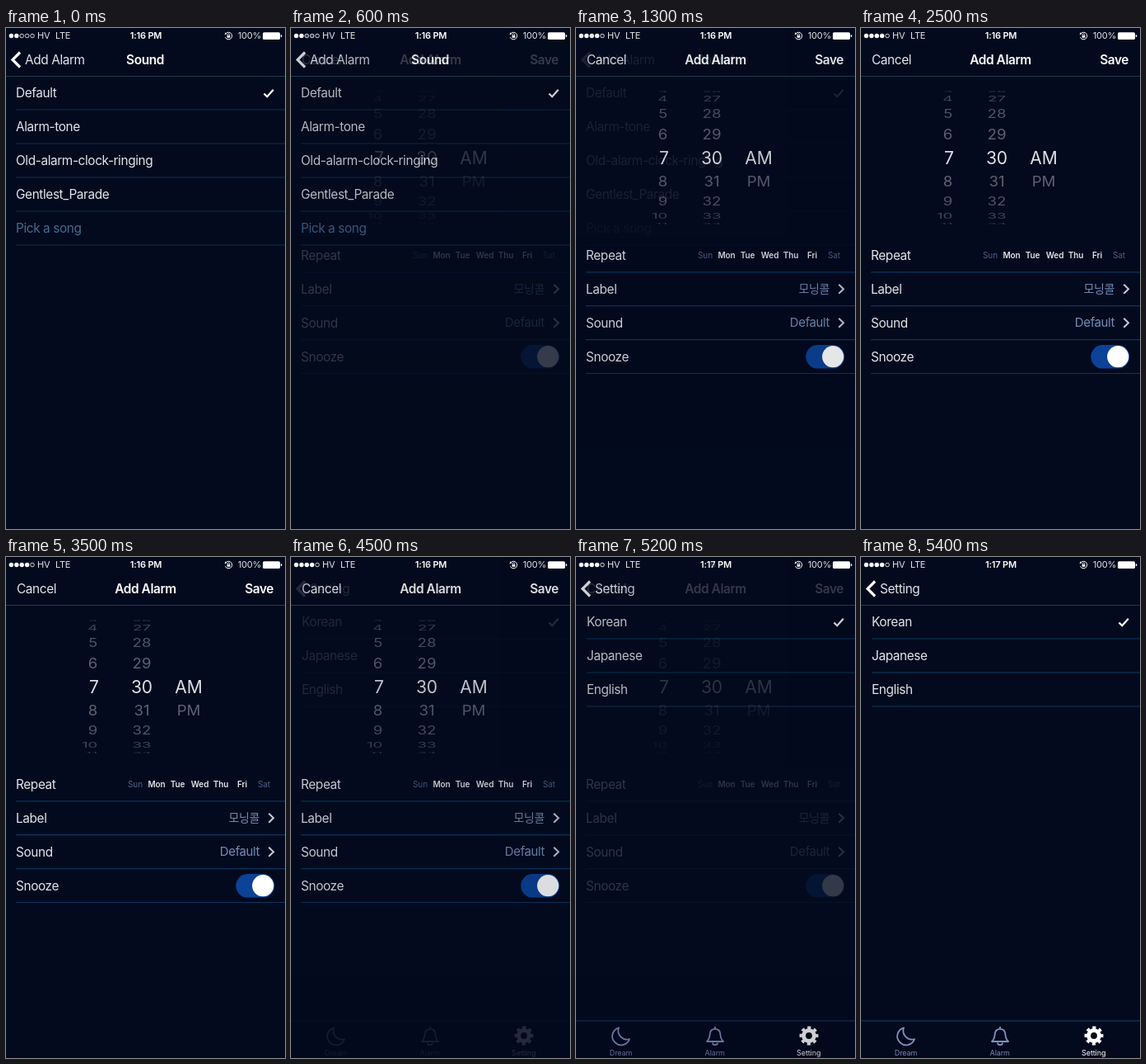
An HTML page that plays this animation: 339x607 px, repeating every 8 s.

```html
<!DOCTYPE html>
<html lang="en">
<head>
<meta charset="utf-8">
<title>Alarm settings</title>
<style>
html, body { margin: 0; width: 100%; height: 100%; overflow: hidden; background: #030a1d; }
svg { position: absolute; left: 0; top: 0; width: 100%; height: 100%; }
text { font: 400 15.4px Inter, "Noto Sans CJK KR", "Noto Sans CJK", sans-serif; letter-spacing: -.4px; fill: #e1e5ea; }
.title { font-weight: 600; fill: #fff; }
.mid { text-anchor: middle; }
.end { text-anchor: end; }
.status { font-size: 11px; letter-spacing: -.2px; }
.pick { font-size: 18.6px; letter-spacing: 0; }
.now { font-size: 21px; fill: #dde1e6; }
.day { font-size: 10px; letter-spacing: -.1px; font-weight: 600; }
.off { font-weight: 400; fill: #486088; }
.value { font-size: 15px; fill: #748cb5; }
.tab { font-size: 9px; letter-spacing: -.1px; fill: #7488b0; }
.line { fill: none; stroke: #fff; }
.icon { fill: none; stroke: #7f93bd; stroke-width: 1.8; stroke-linejoin: round; }
#alarm { animation: toAlarm 8s infinite; }
#setting { animation: toSetting 8s infinite; }
@keyframes toAlarm {
  0% { opacity: 0; animation-timing-function: step-end; }
  5% { opacity: 0; animation-timing-function: steps(10); }
  17.5%, 100% { opacity: 1; }
}
@keyframes toSetting {
  0% { opacity: 0; animation-timing-function: step-end; }
  52.5% { opacity: 0; animation-timing-function: steps(2); }
  55% { opacity: .04; animation-timing-function: steps(10); }
  67.5%, 100% { opacity: 1; }
}
</style>
</head>
<body>
<svg id="sound" viewBox="0 0 339 607" preserveAspectRatio="none"></svg>
<svg id="alarm" viewBox="0 0 339 607" preserveAspectRatio="none"></svg>
<svg id="setting" viewBox="0 0 339 607" preserveAspectRatio="none"></svg>
<script>
const text = (x, y, label, cls = '', extra = '') =>
  `<text x="${x}" y="${y}" class="${cls}" ${extra}>${label}</text>`;
const line = (x, y, color) =>
  `<path class="line" d="M${x} ${y}H339" style="stroke:${color};stroke-width:1.2"/>`;
const stroke = (d, width, color = '#fff') =>
  `<path class="line" d="${d}" style="stroke:${color};stroke-width:${width}"/>`;
const back = label => stroke('M17 29.5L8 38.5L17 47.5', 3.2) + text(23, 44, label);
const check = () => stroke('M313.5 79.5L317.3 83.2L324.8 74.8', 2.3);
const each = (list, fn) => list.map(fn).join('');

function statusBar(bars, time) {
  const dots = each([0, 1, 2, 3, 4], i => i < bars
    ? `<circle cx="${6.4 + 6.4 * i}" cy="9.5" r="2.7" fill="#fff"/>`
    : `<circle cx="${6.4 + 6.4 * i}" cy="9.5" r="2.3" class="line" stroke-width=".8"/>`);
  const lock = stroke('M267.2 6.6A4.3 4.3 0 1 1 266.4 11.2', 1) +
    '<path d="M265.6 8.2l.8-3 2.3 2z" fill="#fff"/><rect x="268.6" y="9" width="3.8" height="2.8" fill="#fff"/>' +
    stroke('M269.3 9V8.2a1.2 1.2 0 0 1 2.4 0V9', .8);
  const battery = '<rect x="312" y="5.2" width="21" height="8.8" rx="1.6" fill="#fff"/>' +
    '<path d="M333.8 8v3.2a1.6 1.6 0 0 0 0-3.2z" fill="#fff"/>';
  return '<rect width="339" height="607" fill="#030a1d"/>' + dots +
    text(38, 13.4, 'HV', 'status') + text(60, 13.4, 'LTE', 'status') +
    text(170, 13.4, time, 'status title mid') + lock +
    text(310, 13.4, '100%', 'status end') + battery + line(0, 58.5, '#174050');
}

function list(x, labels, color) {
  return each(labels, (label, i) =>
    text(x, 84.3 + 41 * i, label) + line(x, 99 + 41 * i, color));
}

// Wheel rows sit on a cylinder of radius 81, 20.5 degrees apart.
function wheel(x, first, from, to, anchor) {
  let out = '';
  for (let k = from; k <= to; k++) {
    const a = k * 20.5 * Math.PI / 180, c = Math.cos(a);
    const label = typeof first === 'number' ? first + k : first[k];
    const shade = [1, .4, .34, .27, .2][Math.abs(k)];
    const dx = k === 0 && anchor === 'end' ? 1.5 : 0;
    const size = k ? 6.7 : 7.6;
    out += `<g transform="translate(${x + dx} ${157 + 81 * Math.sin(a)}) scale(1 ${c})" opacity="${shade}">` +
      text(0, size, label, `pick ${anchor}${k ? '' : ' now'}`) + '</g>';
  }
  return out;
}

function soundScreen() {
  const sep = '#0d3050';
  return statusBar(2, '1:16 PM') + back('Add Alarm') + text(169, 44, 'Sound', 'title mid') +
    list(12, ['Default', 'Alarm-tone', 'Old-alarm-clock-ringing', 'Gentlest_Parade'], sep) +
    text(12, 248.3, 'Pick a song', '', 'style="fill:#466a90"') + line(12, 263, sep) + check();
}

function alarmScreen() {
  const days = [['Sun', 157], ['Mon', 183], ['Tue', 208.5], ['Wed', 235.5], ['Thu', 261], ['Fri', 287], ['Sat', 313.5]];
  const arrow = y => stroke(`M319.3 ${y - 5.5}L325 ${y}L319.3 ${y + 5.5}`, 2, '#c3cbd6');
  return statusBar(4, '1:16 PM') + text(13, 44, 'Cancel') +
    text(169.5, 44, 'Add Alarm', 'title mid') + text(325, 44, 'Save', 'title end') +
    wheel(111.3, 7, -4, 4, 'end') + wheel(165, 30, -4, 4, 'mid') + wheel(222, ['AM', 'PM'], 0, 1, 'mid') +
    each(['Repeat', 'Label', 'Sound', 'Snooze'], (label, i) =>
      text(12, 280.6 + 41 * i, label) + line(12, 295.8 + 40.9 * i, '#0d3560')) +
    each(days, ([day, x], i) => text(x, 278.8, day, 'day mid' + (i % 6 ? '' : ' off'))) +
    text(308, 321, '모닝콜', 'value end', 'style="font-size:14px"') + arrow(316.3) +
    text(308, 362.4, 'Default', 'value end') + arrow(357.2) +
    '<rect x="279.3" y="384" width="47" height="28.6" rx="14.3" fill="#0c4297"/>' +
    '<circle cx="312.2" cy="398.2" r="13.1" fill="#fff"/>';
}

function settingScreen() {
  const ring = (r, w, dash) => `<circle cx="283" cy="580" r="${r}" class="line" stroke-width="${w}" ${dash}/>`;
  const pitch = 2 * Math.PI * 9.6 / 8;
  const gear = ring(6.4, 5, '') +
    ring(9.6, 3.8, `stroke-dasharray="${pitch * .52} ${pitch * .48}" transform="rotate(-11.7 283 580)"`);
  return statusBar(4, '1:17 PM') + back('Setting') +
    list(13, ['Korean', 'Japanese', 'English'], '#0d3b60') + check() + line(0, 562, '#114373') +
    '<path class="icon" d="M52 570.3A10.7 10.7 0 1 0 65 584A10.5 10.5 0 0 1 52 570.3Z"/>' +
    '<path class="icon" d="M159 587H179C175.6 584 175.6 581 175.2 577.3C174.8 573.4 172 571.8 169 571.8S163.2 573.4 162.8 577.3C162.4 581 162.4 584 159 587ZM169 569v2.5M166 588.5a3 2.6 0 0 0 6 0"/>' +
    gear + text(54.5, 604, 'Dream', 'tab mid') + text(168.7, 604, 'Alarm', 'tab mid') +
    text(282.7, 604, 'Setting', 'tab mid', 'style="fill:#fff"');
}

document.getElementById('sound').innerHTML = soundScreen();
document.getElementById('alarm').innerHTML = alarmScreen();
document.getElementById('setting').innerHTML = settingScreen();
</script>
</body>
</html>
```
